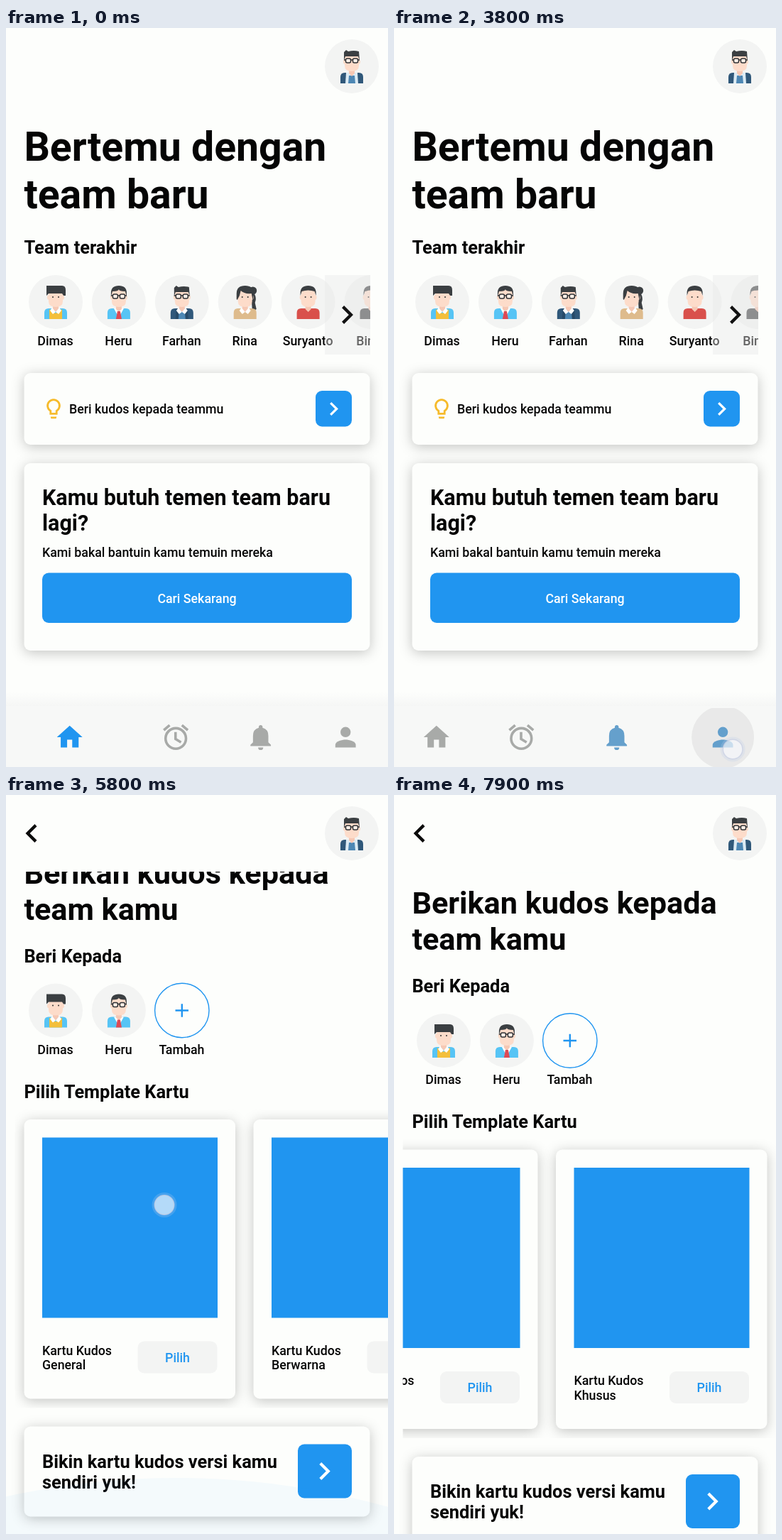
An HTML page for the animation above (8 s loop, 538x1041 px).

```html
<!DOCTYPE html>
<html lang="id">
<head>
<meta charset="utf-8">
<title>Kudos team</title>
<style>
html, body { margin: 0; width: 100%; height: 100%; overflow: hidden; background: #fdfefc; }
svg { display: block; width: 538px; height: 1041px; font-family: Roboto, Arial, sans-serif; }
text { font-size: 17.8px; font-weight: 500; fill: #050505; }
.b { font-weight: 700; }
.mid { text-anchor: middle; }
.h1 { font-size: 57.15px; }
.h2 { font-size: 43.2px; }
.h3 { font-size: 30.48px; }
.h4 { font-size: 25.4px; }
.card { fill: #fdfefc; filter: drop-shadow(0 3px 9px rgba(0, 0, 0, .23)); }
.blue { fill: #2095f0; }
.white { fill: #fff; }
.icon { fill: currentColor; }
.line { fill: none; stroke: currentColor; stroke-width: 2; }
</style>
</head>
<body>
<svg id="stage" viewBox="0 0 538 1041" xmlns="http://www.w3.org/2000/svg"></svg>
<script>
const LOOP = 8000;
const BG = '#fdfefc';

// ---- markup helpers ----
const text = (x, y, s, cls = '') => `<text x="${x}" y="${y}" class="${cls}">${s}</text>`;
const rect = (x, y, w, h, r, attrs) => `<rect x="${x}" y="${y}" width="${w}" height="${h}" rx="${r}" ${attrs}/>`;
const path = (d, fill) => `<path d="${d}" fill="${fill}"/>`;
const line = d => `<path class="line" d="${d}"/>`;
const chevron = (x, y, s, color, flip = 1) =>
  `<g color="${color}" transform="translate(${x} ${y}) scale(${s * flip} ${s})">${line('M-3-5.3L2.3 0-3 5.3')}</g>`;
const clip = (id, x, y, w, h) => `<clipPath id="${id}"><rect x="${x}" y="${y}" width="${w}" height="${h}"/></clipPath>`;

// ---- icons on a 24 unit grid ----
const BULB = line('M9 17V14.2A6 6 0 1 1 15 14.2V17Z') + '<path d="M9 20H15Q15 22 14 22H10Q9 22 9 20Z"/>';
const NAV = [
  '<path d="M10 20V14H14V20H19V12H22L12 3 2 12H5V20Z"/>',
  '<circle class="line" cx="12" cy="13" r="8"/>' + line('M11.8 8V13.4L16.1 16M2.6 6.5L7.2 2.6M21.4 6.5L16.8 2.6'),
  '<path d="M4 19V18L6 16V11Q6 5.8 10.5 4.7V4A1.5 1.5 0 0 1 13.5 4V4.7Q18 5.8 18 11V16L20 18V19ZM10 20H14A2 2 0 0 1 10 20Z"/>',
  '<circle cx="12" cy="8" r="4"/><path d="M4 20V18C4 15.3 9.3 14 12 14S20 15.3 20 18V20Z"/>'
];

// ---- avatars, centred on 0,0 ----
const HAIR = '#3b3f42', SKIN = '#fddcca', NAVY = '#30587a', SKY = '#56c4f5';
const torso = fill => path('M-16 24V15Q-16 9-10 9H10Q16 9 16 15V24Z', fill);
const head = path('M-4 2H4V10L0 14-4 10Z', '#f6c8b4') + rect(-12, -10, 24, 7, 3, `fill="${SKIN}"`) +
  path('M-10-17H10V-1Q10 7 0 7T-10-1Z', SKIN);
const eyes = '<g fill="#333"><circle cx="-4" cy="-7" r="1"/><circle cx="4" cy="-7" r="1"/></g>';
const glasses = '<g fill="#fff" fill-opacity=".55" stroke="#2c3034" stroke-width="1.5">' +
  rect(-8.5, -11, 7, 6, 2, '') + rect(1.5, -11, 7, 6, 2, '') + '<path d="M-1.5-9H1.5M-8.5-9H-11M8.5-9H11"/></g>';
const collar = path('M-5 8L0 14 5 8 8 12 4 17 0 14-4 17-8 12Z', '#fff');
const crop = c => path('M-11-9V-13Q-11-23 0-23T11-13V-9L9-15Q0-18-9-15Z', c);
const quiff = path('M-11-8V-20L-8-23-5-21Q3-23 10-21L11-8 9-14H-9Z', HAIR);
const suit = lapel => torso(NAVY) + path('M-8 9H8L9 24H-9Z', lapel) + path('M-4 13H4L5 24H-5Z', '#4d87b4') + head + quiff + glasses;

const FACES = {
  vest: torso(SKY) + path('M-9 24V10L0 16 9 10V24Z', '#f3bf3b') + head + collar +
    path('M-13-9V-23H9Q14-23 14-17V-9H11L9-12H-10Z', HAIR) + eyes,
  tie: torso(SKY) + path('M-7 9H7L0 22Z', '#fff') + head + path('M-2 13H2L4 24H-4Z', '#dd4a55') +
    path('M-11-7V-13Q-11-23 0-23T11-13V-7L9-15Q0-15 0-18 0-15-9-15Z', HAIR) + glasses,
  navy: suit('#274a68') + collar,
  self: suit('#dcebf4'),
  pony: path('M8-16Q18-10 14 1L16 10Q12 14 10 10L9-5Z', HAIR) + `<circle cx="11" cy="-16" r="5.5" fill="${HAIR}"/>` +
    torso('#debb8c') + head + collar + path('M-12-4V-12Q-12-23 0-23T12-12L11-2 9-12Q-1-11-6-16-7-9-11-3Z', HAIR) + eyes,
  red: torso('#d9504b') + head + crop(HAIR) + eyes,
  gray: torso('#4b4d4f') + head + crop('#4b4d4f') + eyes
};
const face = (kind, x, y) =>
  `<g transform="translate(${x} ${y})"><circle r="38" fill="#f3f4f3"/>${FACES[kind]}</g>`;

const TEAM = [['vest', 'Dimas'], ['tie', 'Heru'], ['navy', 'Farhan'], ['pony', 'Rina'], ['red', 'Suryanto'], ['gray', 'Bimo']];
const members = (n, y) => TEAM.slice(0, n).map(([kind, name], i) => {
  const x = 70 + i * 88.9;
  return face(kind, x, y) + text(x - .5, y + 61, name, 'mid');
}).join('');

// ---- screens ----
const homePage = `
  ${text(25.4, 187, 'Bertemu dengan', 'b h1')}${text(25.4, 254, 'team baru', 'b h1')}
  ${text(25.4, 318, 'Team terakhir', 'b h4')}
  <g clip-path="url(#row)">
    <g id="team">${members(6, 386)}</g>
    <rect id="edge" x="509" y="348" width="4" height="112" fill="#e4e8f8"/>
    <g id="more">${rect(449, 348, 64, 112, 0, 'fill="#e6e7e6" fill-opacity=".42"')}${chevron(481, 404, 2.15, '#111')}</g>
  </g>
  ${rect(25.5, 486, 487, 101, 9, 'class="card"')}
  <g class="icon" color="#f6bb2c" transform="translate(50.2 519.5) scale(1.4)">${BULB}</g>
  ${text(89, 543, 'Beri kudos kepada teammu')}
  ${rect(436, 511, 51, 50.5, 9, 'class="blue"')}${chevron(462, 536.5, 1.6, '#fff')}
  ${rect(25.5, 613, 487, 264, 9, 'class="card"')}
  ${text(51, 672, 'Kamu butuh temen team baru', 'b h3')}${text(51, 707.7, 'lagi?', 'b h3')}
  ${text(51, 745, 'Kami bakal bantuin kamu temuin mereka')}
  ${rect(51, 767.5, 436, 70.5, 9, 'class="blue"')}${text(269, 810, 'Cari Sekarang', 'mid white')}
  <rect y="935" width="538" height="20" fill="url(#fade)"/>
  <rect y="955" width="538" height="86" fill="#f7f8f7"/>
  <g clip-path="url(#bar)">${NAV.map((n, i) => `<circle id="rip${i}" cy="999"/>`).join('')}</g>
  ${NAV.map((icon, i) => `<g id="nav${i}" class="icon">${icon}</g>`).join('')}`;

const template = (name, i) => `<g transform="translate(${i * 323} 0)">
  ${rect(25.5, 499.5, 297.5, 393.5, 9, 'class="card"')}
  ${rect(51, 525, 247, 254, 0, 'class="blue"')}
  ${text(51, 831, 'Kartu Kudos')}${text(51, 851.5, name)}
  ${rect(185.5, 812, 112, 45, 9, 'fill="#f3f4f3"')}${text(241.5, 841, 'Pilih', 'mid blue')}</g>`;

const kudosPage = `
  <rect width="538" height="1041" fill="${BG}"/>
  ${chevron(35.5, 54, 2.15, '#0a0a0a', -1)}
  <g clip-path="url(#body)">
    <g id="scroll">
      ${text(25.4, 167, 'Berikan kudos kepada', 'b h2')}${text(25.4, 218, 'team kamu', 'b h2')}
      ${text(25.4, 278, 'Beri Kepada', 'b h4')}
      ${members(2, 346)}
      <circle cx="247.8" cy="346" r="38.2" fill="none" stroke="#2095f0" stroke-width="1.4"/>
      <path d="M238.5 346H257M247.8 336.8V355.2" stroke="#2095f0" stroke-width="2.4"/>
      ${text(247.5, 407, 'Tambah', 'mid')}
      ${text(25.4, 469, 'Pilih Template Kartu', 'b h4')}
      <g clip-path="url(#list)"><g id="cards">${['General', 'Berwarna', 'Khusus'].map(template).join('')}</g></g>
      ${rect(25.5, 932, 487, 127, 9, 'class="card"')}
      ${text(51, 990, 'Bikin kartu kudos versi kamu', 'b h4')}${text(51, 1019, 'sendiri yuk!', 'b h4')}
      ${rect(411, 957, 76, 76, 9, 'class="blue"')}${chevron(449, 995, 2.08, '#fff')}
    </g>
    <circle id="glowTop" class="blue" cx="230" r="1824"/>
    <circle id="glowEnd" class="blue" cx="240" r="1107"/>
  </g>`;

const stage = document.getElementById('stage');
stage.innerHTML = `<defs>
  ${clip('row', 25.5, 345, 487.5, 118)}${clip('bar', 0, 958, 538, 83)}
  ${clip('body', 0, 108, 538, 933)}${clip('list', 12.5, 485, 525.5, 421)}
  <linearGradient id="fade" x2="0" y2="1"><stop stop-color="#f7f8f7" stop-opacity="0"/><stop offset="1" stop-color="#f5f6f5"/></linearGradient>
  </defs>
  <rect width="538" height="1041" fill="${BG}"/>
  ${homePage}<g id="kudos">${kudosPage}</g>${face('self', 487, 54)}
  <g id="touch"><circle r="17.5" fill="#bccbeb" fill-opacity=".24"/>
  <circle r="13.8" fill="#fff" fill-opacity=".6" stroke="#c6cde2" stroke-opacity=".7" stroke-width="1.5"/></g>`;
const el = {};
stage.querySelectorAll('[id]').forEach(n => el[n.id] = n);

// ---- motion ----
const linear = p => p;
const smooth = p => p * p * (3 - 2 * p);
const sineOut = p => Math.sin(p * Math.PI / 2);
const cubicOut = p => 1 - (1 - p) ** 3;
const ramp = (t, start, dur, ease = linear) => ease(Math.min(1, Math.max(0, (t - start) / dur)));
const hump = (t, on, off, dur, ease) => ramp(t, on, dur, ease) - ramp(t, off, dur, ease);

const set = (n, attrs) => { for (const k in attrs) n.setAttribute(k, attrs[k]); };
const move = (x, y) => `translate(${x} ${y})`;
const show = (n, on) => set(n, { display: on ? 'inline' : 'none' });
const tint = w => `color-mix(in srgb, #2095f0 ${w * 100}%, #a8aaa8)`;

function touchAt(x, y) {
  show(el.touch, true);
  set(el.touch, { transform: move(x, y) });
}
function swipe(t, start, end, x, y, dx, dy) {
  const p = ramp(t, start, end - start);
  if (t >= start && t < end) touchAt(x + dx * p, y + dy * p);
}

// Tabs are tapped one after another; the active one is half as wide again.
function drawNav(t) {
  const unit = 538 / 4.5, tap = i => 3060 + 320 * (i - 1);
  let left = 0;
  NAV.forEach((icon, i) => {
    const w = (i ? ramp(t, tap(i), 200) : 1) - (i < 3 ? ramp(t, tap(i + 1), 200) : 0);
    const wide = unit * (1 + w / 2), x = left + wide / 2;
    left += wide;
    set(el['nav' + i], { color: tint(w), transform: `translate(${x - 21.6} 977.4) scale(1.8)` });
    if (!i) return;
    set(el['rip' + i], { cx: x, r: 44 * ramp(t, tap(i), 100), opacity: .06 * hump(t, tap(i), tap(i) + 200, 100) });
    if (Math.abs(t - tap(i) - 50) <= 100) touchAt(x + 14, 1016);
  });
}

function draw(t) {
  show(el.touch, false);
  drawNav(t);

  const ended = hump(t, 950, 1650, 250);
  set(el.team, { transform: move(42.5 * ramp(t, 1550, 450, sineOut) - 44.5 * ramp(t, 900, 280, smooth), 0) });
  set(el.more, { opacity: 1 - .5 * ended });
  set(el.edge, { opacity: .8 * hump(t, 1100, 1400, 100) });

  show(el.kudos, t > 4600);
  set(el.kudos, { opacity: ramp(t, 4600, 350, smooth) });
  const rise = 83 * (1 - ramp(t, 4600, 350, cubicOut));
  set(el.scroll, { transform: move(0, rise - 42.5 * hump(t, 5520, 6200, 250, smooth)) });
  set(el.cards, { transform: move(-443.5 * ramp(t, 6917, 883, sineOut), 0) });

  const top = ramp(t, 6430, 220) - ramp(t, 7100, 850), end = hump(t, 5680, 6050, 120);
  set(el.glowTop, { cy: 108 + 52 * top - 1824, opacity: .09 * top });
  set(el.glowEnd, { cy: 1041 - 79 * end + 1107, opacity: .04 * end });

  swipe(t, 850, 1350, 345, 392, -225, -7);
  swipe(t, 1540, 1880, 165, 388, 95, 4);
  swipe(t, 4430, 4590, 465, 541, 0, 0);
  swipe(t, 5480, 6020, 226, 735, -5, -265);
  swipe(t, 6180, 6620, 228, 545, 7, 155);
  swipe(t, 6900, 7200, 276, 712, -224, 6);
}

const begin = performance.now();
function tick() {
  draw((performance.now() - begin) % LOOP);
  requestAnimationFrame(tick);
}
tick();
</script>
</body>
</html>
```
